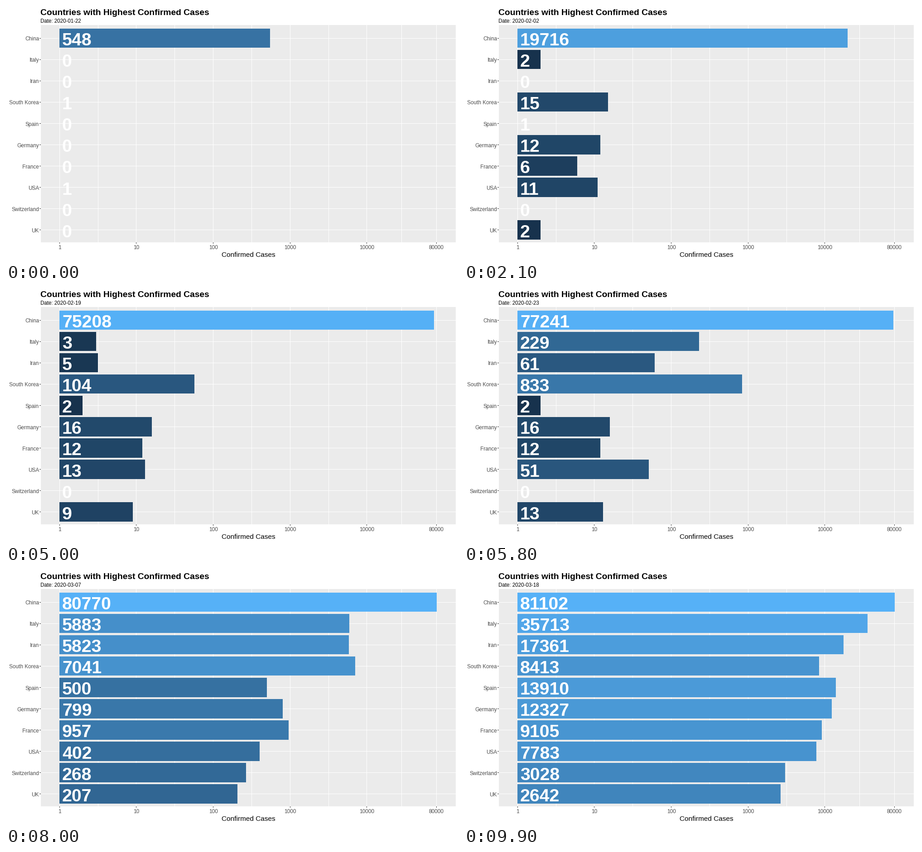
Animation of 998 by 561 pixels, one loop 10000 ms. Source, as a matplotlib script:

```python
import matplotlib.pyplot as plt
import numpy as np
from matplotlib.animation import FuncAnimation
from matplotlib.patches import Rectangle

W, H, DPI = 998, 561, 64
FRAMES, INTERVAL = 100, 100
LAST_DAY = 56
START = np.datetime64("2020-01-22")

LEFT, RIGHT, TOP, BOTTOM = 77, 993, 42, 522
X0, DECADE = 118.16, 169.7      # pixel of value 1, pixels per power of ten
ROW0, ROW_STEP, BAR_H = 71.1, 47.06, 42.35

days = np.arange(LAST_DAY + 1)
names, series = [], []


def add(name, points):
    """Cumulative cases through (day: count) points, zero before the first."""
    logs = np.log(list(points.values()))
    curve = np.exp(np.interp(days, list(points), logs, left=-np.inf))
    names.append(name)
    series.append(np.rint(curve).astype(int))


add("China", {0: 548, 1: 643, 3: 1406, 5: 2877, 6: 5509, 7: 6087, 10: 11891,
              11: 16630, 12: 19716, 14: 27440, 18: 39829, 21: 44759, 22: 59895,
              23: 66358, 27: 74211, 33: 77241, 40: 80136, 45: 80770,
              56: 81102})
add("Italy", {9: 2, 15: 2, 16: 3, 29: 3, 30: 20, 31: 62, 32: 155, 33: 229,
              36: 655, 40: 2036, 43: 3858, 45: 5883, 47: 9172, 49: 12462,
              50: 12462, 51: 17660, 56: 35713})
add("Iran", {28: 2, 29: 5, 30: 18, 31: 28, 33: 61, 35: 139, 36: 245, 38: 593,
             40: 1501, 41: 2336, 43: 3513, 45: 5823, 48: 8042, 52: 12729,
             56: 17361})
add("South Korea", {0: 1, 1: 1, 2: 2, 3: 2, 5: 4, 8: 4, 9: 11, 11: 15, 12: 15,
                    15: 23, 20: 28, 24: 28, 28: 31, 29: 104, 31: 433, 33: 833,
                    34: 977, 38: 3150, 40: 4335, 45: 7041, 56: 8413})
add("Spain", {10: 1, 17: 1, 18: 2, 33: 2, 34: 6, 35: 13, 36: 15, 37: 32,
              40: 120, 42: 222, 43: 259, 44: 400, 45: 500, 46: 673, 48: 1695,
              49: 2277, 50: 2277, 51: 5232, 56: 13910})
add("Germany", {5: 1, 6: 4, 8: 4, 10: 8, 12: 12, 15: 12, 19: 14, 20: 16,
                33: 16, 34: 17, 36: 46, 37: 48, 39: 130, 40: 159, 42: 262,
                43: 482, 45: 799, 50: 2078, 51: 3675, 56: 12327})
add("France", {2: 2, 3: 3, 5: 3, 7: 5, 9: 5, 10: 6, 16: 6, 17: 11, 23: 11,
               24: 12, 33: 12, 35: 18, 36: 38, 38: 100, 40: 191, 41: 204,
               43: 380, 45: 957, 47: 1209, 49: 2284, 50: 2284, 51: 3667,
               56: 9105})
add("USA", {0: 1, 1: 1, 2: 2, 3: 2, 4: 5, 8: 5, 9: 7, 11: 8, 12: 11, 19: 11,
            22: 13, 29: 13, 30: 15, 32: 15, 33: 51, 37: 60, 40: 98, 45: 402,
            47: 583, 48: 959, 56: 7783})
add("Switzerland", {34: 1, 35: 1, 36: 8, 37: 8, 38: 18, 40: 42, 42: 90,
                    43: 114, 44: 214, 45: 268, 47: 374, 49: 652, 50: 652,
                    51: 1139, 52: 1359, 53: 2200, 54: 2200, 56: 3028})
add("UK", {9: 2, 15: 2, 16: 3, 18: 3, 19: 8, 21: 9, 32: 9, 33: 13, 35: 13,
           38: 23, 39: 36, 40: 40, 42: 86, 45: 207, 49: 459, 50: 459,
           51: 802, 52: 1143, 53: 1144, 56: 2642})

cases = np.array(series)
logs = np.log10(np.maximum(cases, 1))
# frame on which each day's values are reached exactly
keys = np.ceil(days * (FRAMES - 1) / LAST_DAY - 0.5).astype(int)

# gradient blended in CIE Lab
TO_XYZ = np.array([[0.4124, 0.3576, 0.1805],
                   [0.2126, 0.7152, 0.0722],
                   [0.0193, 0.1192, 0.9505]])
WHITE = TO_XYZ.sum(axis=1)
TO_LAB = np.array([[0, 116, 0], [500, -500, 0], [0, 200, -200]])


def to_lab(rgb):
    c = np.array(rgb) / 255
    c = np.where(c > 0.04045, ((c + 0.055) / 1.055) ** 2.4, c / 12.92)
    f = TO_XYZ @ c / WHITE
    f = np.where(f > 0.008856, np.cbrt(f), 7.787 * f + 16 / 116)
    return TO_LAB @ f


def to_rgb(lab):
    f = np.linalg.solve(TO_LAB, lab)
    xyz = np.where(f > 0.2069, f ** 3, (f - 16 / 116) / 7.787) * WHITE
    c = np.clip(np.linalg.solve(TO_XYZ, xyz), 0, 1)
    c = np.where(c > 0.0031308, 1.055 * c ** (1 / 2.4) - 0.055, 12.92 * c)
    return np.clip(c, 0, 1)


LOW, HIGH = to_lab((19, 43, 67)), to_lab((86, 177, 247))


def shade(log_value):
    return to_rgb(LOW + (HIGH - LOW) * log_value / logs.max())


plt.rcParams["font.family"] = "Liberation Sans"
fig = plt.figure(figsize=(W / DPI, H / DPI), dpi=DPI, facecolor="white")
ax = fig.add_axes([0, 0, 1, 1])
ax.set(xlim=(0, W), ylim=(H, 0))
ax.axis("off")


def box(x, y, w, h, color, z):
    return ax.add_patch(Rectangle((x, y), w, h, fc=color, lw=0,
                                  antialiased=False, zorder=z))


def write(x, y, s, px, color="black", ha="left", weight="normal"):
    return ax.text(x, y, s, size=px * 72 / DPI, color=color, ha=ha,
                   va="baseline", weight=weight, zorder=5)


def x_of(log_value):
    return X0 + DECADE * log_value


box(LEFT, TOP, RIGHT - LEFT, BOTTOM - TOP, "#EBEBEB", 0)

breaks = [1, 10, 100, 1000, 10000, 80000]
majors = np.log10(breaks)
minors = (majors[1:] + majors[:-1]) / 2
for v in [*majors, *minors]:
    box(int(x_of(v)), TOP, 1, BOTTOM - TOP, "white", 1)
for value, v in zip(breaks, majors):
    box(int(x_of(v)), BOTTOM, 1, 3, "#333333", 1)
    write(x_of(v), 537, str(value), 11.8, "#4D4D4D", "center")

bars, labels = [], []
for k, name in enumerate(names):
    mid = ROW0 + ROW_STEP * k
    box(LEFT, int(mid), RIGHT - LEFT, 1, "white", 1)
    box(LEFT - 3, int(mid), 3, 1, "#333333", 1)
    write(73, round(mid + 5.2), name, 11.8, "#4D4D4D", "right")
    y1, y2 = round(mid - BAR_H / 2), round(mid + BAR_H / 2)
    bars.append(box(118, y1, 0, y2 - y1, "white", 3))
    labels.append(write(124, round(mid + 16), "", 39.3, "white",
                        weight="bold"))

write(76.5, 19.5, "Countries with Highest Confirmed Cases", 19.3,
      weight="bold")
subtitle = write(76.5, 37, "", 11.5)
write(535, 554, "Confirmed Cases", 15.4, ha="center")


def update(i):
    b = int(np.searchsorted(keys, i))
    a = b if keys[b] == i else b - 1
    t = 0 if a == b else (i - keys[a]) / (keys[b] - keys[a])
    now = (1 - t) * logs[:, a] + t * logs[:, b]
    shown = cases[:, b if t >= 0.5 else a]
    for k, (bar, label) in enumerate(zip(bars, labels)):
        width = round(x_of(now[k])) - 118
        bar.set_visible(bool(cases[k, a] > 0 and width > 0))
        bar.set_width(width)
        bar.set_facecolor(shade(now[k]))
        label.set_text(str(shown[k]))
    subtitle.set_text(f"Date: {START + i * LAST_DAY // (FRAMES - 1)}")
    return [*bars, *labels, subtitle]


anim = FuncAnimation(fig, update, frames=FRAMES, interval=INTERVAL,
                     repeat=True, repeat_delay=0, blit=False)
plt.show()
```
